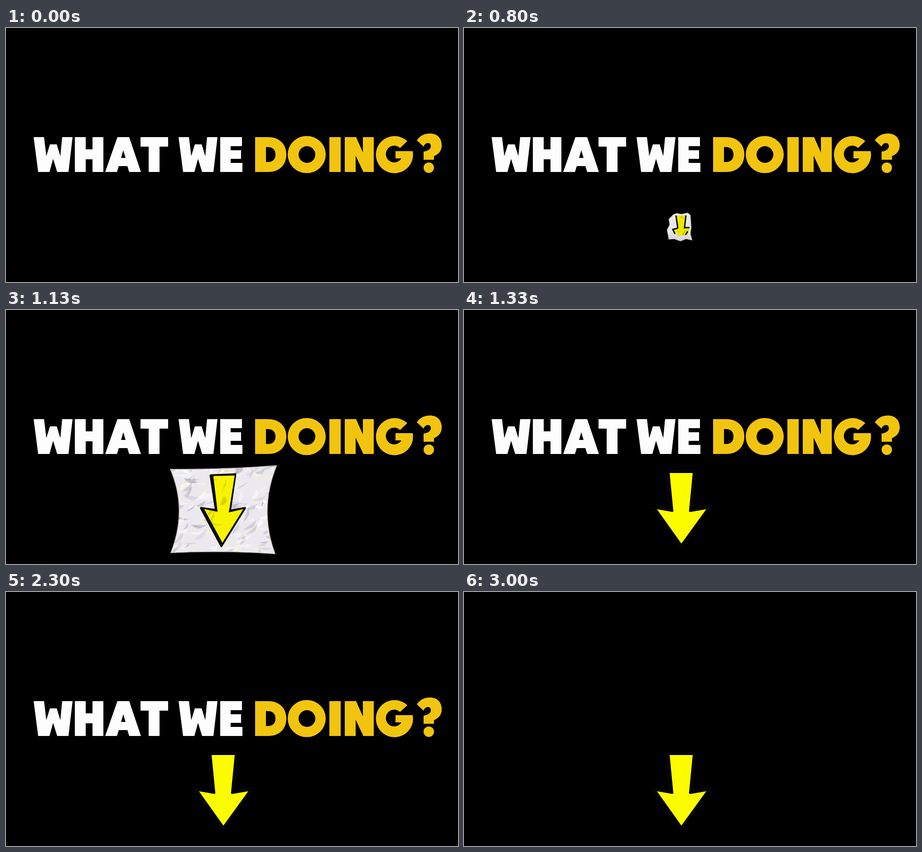
Recreate the animation shown at these times as an HTML page. Size 998 by 561 pixels, loop 3030 ms.

```html
<!DOCTYPE html>
<html lang="en">
<head>
<meta charset="utf-8">
<title>What we doing?</title>
<style>
html, body { margin: 0; width: 100%; height: 100%; overflow: hidden; background: #000; }
svg { position: absolute; left: 0; top: 0; width: 998px; height: 561px; }
h1 { position: absolute; left: 61px; top: 232px; margin: 0; color: transparent;
  font: 900 88px/88px Lato, sans-serif; white-space: nowrap; }
.pose { visibility: hidden; }
.ink { mix-blend-mode: multiply; }
</style>
</head>
<body>
<h1 id="heading">WHAT WE DOING?</h1>
<svg viewBox="0 0 998 561" aria-hidden="true">
  <defs>
    <path id="w" d="M61 241H84L89 283 97 257H112L120 283 124 241H147L138 318H113L104 289 96 318H71Z"/>
    <path id="sheetEdge" d="M380 365Q480 366 580 358Q546 441 577 524Q480 517 381 522Q413 441 380 365Z"/>
    <path id="ballEdge" d="M462 412L470 409 480 411 494 408 500 413 502 440 500 454 504 469 490 466 478 471 464 466 452 467 450 456 448 446 454 434 452 422Z"/>
    <clipPath id="sheetClip"><use href="#sheetEdge"/></clipPath>
    <clipPath id="ballClip"><use href="#ballEdge"/></clipPath>
  </defs>

  <!-- Display lettering -->
  <g id="title" fill-rule="evenodd">
    <g fill="#fdfdfd">
      <use href="#w"/>
      <use href="#w" x="320"/>
      <path d="M152 241H176V268H191V241H215V318H191V290H176V318H152Z"/>
      <path d="M246 241H272L298 318H272L268 305H249L245 318H219ZM259 270L254 287H264Z"/>
      <path d="M297 241H358V262H339V318H315V262H297Z"/>
      <path d="M473 241H521V261H496V270H519V289H496V298H522V318H473Z"/>
    </g>
    <g fill="#f1c40f">
      <path d="M550 241H579C604 241 619 257 619 279.500S604 318 579 318H550ZM574 263V296H578C589 296 595 290 595 279.500S589 263 578 263Z"/>
      <path d="M622 279.500A42 41 0 0 1 706 279.500A42 41 0 0 1 622 279.500ZM646 279.500A18.500 18.500 0 0 0 683 279.500A18.500 18.500 0 0 0 646 279.500Z"/>
      <path d="M714 241H739V318H714Z"/>
      <path d="M748 241H773L788 275V241H812V318H789L772 282V318H748Z"/>
      <path d="M886 250A41 41 0 1 0 898 272H860V288H873A18.500 18.500 0 1 1 870 265Z"/>
      <path d="M907 248C914 238 924 233 936 233C952 233 962 243 962 259C962 273 954 279 945 283V291H922V273C933 271 938 267 938 261C938 257 936 254 932 254C927 254 924 257 922 262Z"/>
      <circle cx="933.500" cy="308.500" r="11.500"/>
    </g>
  </g>

  <g id="ball" class="pose">
    <g clip-path="url(#ballClip)">
      <use href="#ballEdge" fill="#e9e7ec"/>
      <g id="ballFolds"></g>
      <g class="ink">
        <path d="M469 414H491L487 441 498 442 494 457 480 462 470 458 460 445 473 443Z" fill="#ff0"/>
        <path d="M468 414L472 442 461 445 466 455M490 414L487 441 498 441M494 449L488 459" fill="none" stroke="#080808" stroke-width="3"/>
      </g>
      <path d="M447 468L453 454 464 458 468 452 473 459 490 457 505 462V472H447Z" fill="#dcdadf"/>
    </g>
    <use href="#ballEdge" fill="none" stroke="#77757a"/>
  </g>

  <g id="sheet" class="pose">
    <g clip-path="url(#sheetClip)">
      <use href="#sheetEdge" fill="#ebe9ef"/>
      <g id="sheetFolds"></g>
      <g class="ink">
        <path d="M456 377L502 375 492 443 520 438 476 509 438 438 466 442Z" fill="#0a0a0a" stroke="#0a0a0a" stroke-width="4" stroke-linejoin="round"/>
      </g>
      <path d="M461 378L501 377 490 446 517 440 478 503 444 440 469 445Z" fill="#f8f400"/>
      <g id="arrowFolds" class="ink" clip-path="url(#inkClip)"></g>
    </g>
    <use href="#sheetEdge" fill="none" stroke="#8f8e8c"/>
  </g>
  <clipPath id="inkClip"><path d="M461 378L501 377 490 446 517 440 478 503 444 440 469 445Z"/></clipPath>

  <g id="arrow" class="pose">
    <path d="M447 355H511L503 439 544 433 478 525 415 436 454 440Z" fill="#000" stroke="#151515" stroke-linejoin="round"/>
    <path d="M454 360H505L497 442Q496 446 500 446L535 440 480 516 426 440 460 446Q463 446 462 442Z" fill="#fcfc00"/>
  </g>
</svg>
<script>
const LOOP = 3030, TITLE_END = 3000;
const byId = id => document.getElementById(id);
const layers = ["ball", "sheet", "arrow"].map(byId);

// start time, visible pose, scale, rotation
const steps = [
  [0, ""],
  [470, "ball", 0.45, -20],
  [530, "ball", 0.7, 10],
  [630, "ball", 0.85, -12],
  [730, "ball", 1, 0],
  [870, "ball", 1.5, 8],
  [930, "sheet", 0.7, -6],
  [1000, "sheet", 1, 0],
  [1070, "sheet", 1.18, 0],
  [1200, "arrow", 1, 0]
];

function random(seed) {
  return () => (seed = seed * 16807 % 2147483647) / 2147483647;
}

// Thin slanted facets that read as creased paper
function crumple(id, seed, count, box, size) {
  const rnd = random(seed), [x, y, w, h] = box;
  const tones = ["#fff", "#fff", "#9d9ba6", "#bab8c2", "#f6f1c8"];
  let markup = "";
  for (let i = 0; i < count; i++) {
    const px = x + rnd() * w, py = y + rnd() * h;
    const angle = -0.5 + (rnd() - 0.5) * 1.7;
    const len = size * (0.5 + rnd()), wide = size * (0.1 + rnd() * 0.3);
    const c = Math.cos(angle), s = Math.sin(angle);
    const pts = [[0, 0], [len, 0], [len * 0.6, wide], [len * 0.2, wide * 0.6]]
      .map(([a, b]) => `${(px + a * c - b * s).toFixed(1)},${(py + a * s + b * c).toFixed(1)}`);
    const tone = tones[Math.floor(rnd() * tones.length)];
    markup += `<polygon points="${pts.join(" ")}" fill="${tone}" opacity="${(0.25 + rnd() * 0.3).toFixed(2)}"/>`;
  }
  byId(id).innerHTML = markup;
}

crumple("ballFolds", 41, 60, [444, 405, 60, 66], 13);
crumple("sheetFolds", 97, 210, [372, 355, 205, 170], 23);
crumple("arrowFolds", 63, 45, [435, 372, 80, 135], 20);

function draw(t) {
  const [, pose, scale, turn] = steps.findLast(step => step[0] <= t);
  for (const layer of layers) {
    const on = layer.id === pose;
    layer.style.visibility = on ? "visible" : "hidden";
    if (on) {
      const [cx, cy] = pose === "ball" ? [476, 440] : [479, 441];
      layer.setAttribute("transform",
        `translate(${cx} ${cy}) rotate(${turn}) scale(${scale}) translate(${-cx} ${-cy})`);
    }
  }
  const shown = t < TITLE_END ? "visible" : "hidden";
  byId("title").style.visibility = byId("heading").style.visibility = shown;
}

const start = performance.now();
function tick() {
  draw((performance.now() - start) % LOOP);
  requestAnimationFrame(tick);
}
tick();
</script>
</body>
</html>
```
